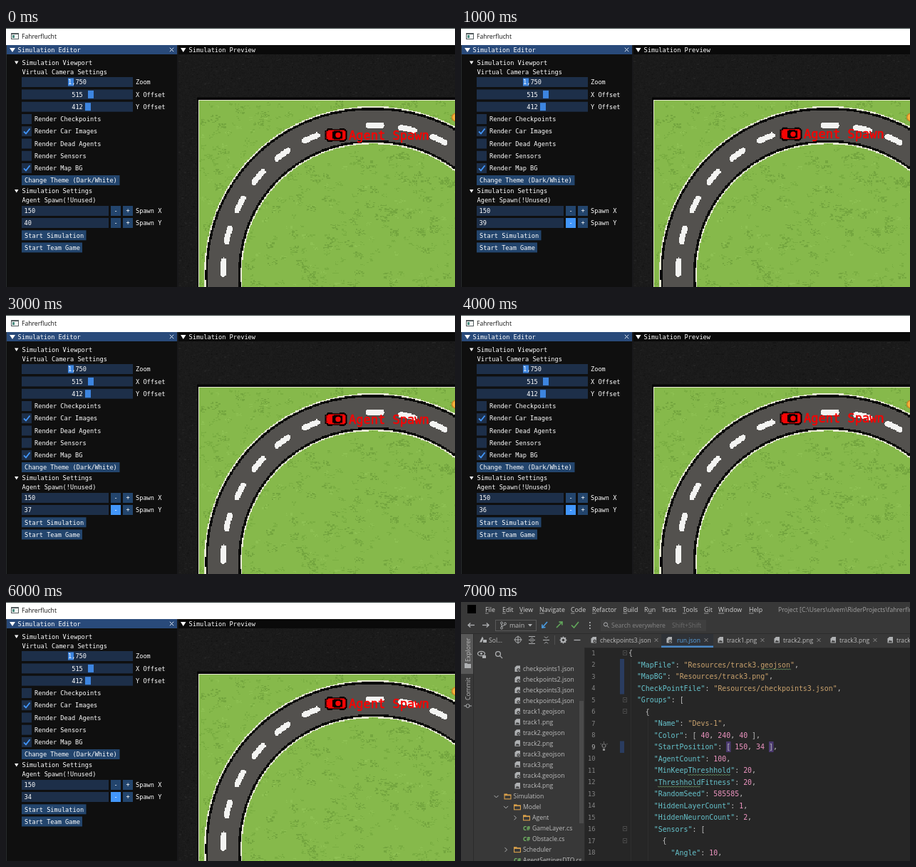
These frames come from a looping animation (630 by 364 pixels, 8 s). An HTML page with a canvas:

```html
<!DOCTYPE html>
<html lang="en">
<head>
<meta charset="utf-8">
<title>Simulation editor</title>
<style>
html, body { margin: 0; width: 100%; height: 100%; overflow: hidden; background: #0f0f0f; }
canvas { display: block; width: 630px; height: 364px; }
</style>
</head>
<body>
<canvas id="stage" width="630" height="364"></canvas>
<script>
const W = 630, H = 364, LOOP = 8000;
const MONO = '"DejaVu Sans Mono", monospace';
const UI = '"Open Sans", "Noto Sans", sans-serif';
const ctx = document.getElementById('stage').getContext('2d');
let g;

function layer(w, h, paint) {
  const c = document.createElement('canvas');
  c.width = w;
  c.height = h;
  g = c.getContext('2d');
  paint();
  return c;
}

function seeded(seed) {
  return () => (seed = (seed * 16807) % 2147483647) / 2147483647;
}

function box(x, y, w, h, color) {
  g.fillStyle = color;
  g.fillRect(x, y, w, h);
}

function text(s, x, y, font, color, align = 'left') {
  g.font = font;
  g.fillStyle = color;
  g.textAlign = align;
  g.fillText(s, x, y);
}

function poly(points, color, fill) {
  g.beginPath();
  for (let i = 0; i < points.length; i += 2) g.lineTo(points[i], points[i + 1]);
  if (fill) {
    g.fillStyle = color;
    g.fill();
  } else {
    g.strokeStyle = color;
    g.stroke();
  }
}

function ring(x, y, r, color, fill) {
  g.beginPath();
  g.arc(x, y, r, 0, 7);
  g[fill ? 'fillStyle' : 'strokeStyle'] = color;
  g[fill ? 'fill' : 'stroke']();
}

function cross(x, y, r, color) {
  poly([x - r, y - r, x + r, y + r], color);
  poly([x + r, y - r, x - r, y + r], color);
}

/* ---- simulation window ---- */

const CELL = 4 / 3;
const FRAME = '#1d2f49', BUTTON = '#23456d', BLUE = '#4296fa', GRAB = '#3d85e0';

const gravel = layer(292, 246, () => {
  const rnd = seeded(77);
  for (let y = 0; y < 246; y++)
    for (let x = 0; x < 292; x++) {
      const v = 24 + Math.floor(rnd() * 6);
      box(x, y, 1, 1, `rgb(${v},${v},${v})`);
    }
  for (let i = 0; i < 900; i++)
    box(Math.floor(rnd() * 292), Math.floor(rnd() * 246), 2, 1, rnd() < .5 ? '#151515' : '#232323');
});

// The bend is very slightly squarer than a circle.
function roadColor(x, y) {
  const dx = 515 - x, dy = 347 - y, p = 2.04;
  const r = (Math.abs(dx) ** p + Math.abs(dy) ** p) ** (1 / p);
  const across = Math.abs(r - 210.5);
  const edge = 26.4 - across;
  if (edge < 0) return null;
  if (edge < 1.8) return '#e6e8d2';
  if (edge < 5) return '#080808';
  const a = Math.atan2(dy, dx) * 180 / Math.PI - 2.9;
  const k = Math.round(a / 12.55);
  const along = Math.abs(a - k * 12.55) * Math.PI / 180 * r;
  const dash = k !== 6 && Math.hypot(across, Math.max(0, along - 9.5)) < 3.9;
  return dash ? '#f4f4f2' : '#53514e';
}

const field = layer(270, 198, () => {
  const rnd = seeded(4242);
  const cell = (x, y, color) => box(Math.floor(x), Math.floor(y), 1 + Math.floor(rnd() * 2), 1, color);
  box(0, 0, 270, 198, '#86b94b');
  for (let i = 0; i < 420; i++) {
    const x = rnd() * 270, y = rnd() * 198, dark = rnd() < .8;
    for (let j = 0; j < 6; j++) cell(x + rnd() * 5, y + rnd() * 4, dark ? '#7aae42' : '#8ec153');
  }
  for (let i = 0; i < 110; i++) {
    const x = rnd() * 270, y = rnd() * 198;
    for (let j = 0; j < 18; j++) cell(x + rnd() * 9, y + rnd() * 7, '#74a63f');
  }
  box(0, 0, 270, 1, '#e6e8d2');
  box(0, 0, 1, 198, '#e6e8d2');
  for (let y = 0; y < 198; y++)
    for (let x = 0; x < 270; x++) {
      const color = roadColor(270 + (x + .5) * CELL, 101 + (y + .5) * CELL);
      if (color) box(x, y, 1, 1, color);
    }
});

function label(s, x, mid, align) {
  text(s, x, mid + 3.2, '8.65px ' + MONO, '#fff', align);
}

function arrowDown(x, y, w, h) {
  poly([x, y, x + w, y, x + w / 2, y + h], '#fff', true);
}

function slider(s, name, mid, grab) {
  box(22, mid - 7, 156, 14, FRAME);
  box(grab, mid - 5.5, 8, 11, GRAB);
  label(s, 100, mid, 'center');
  label(name, 182, mid);
}

function checkbox(name, mid, on) {
  box(22, mid - 7, 14, 14, FRAME);
  if (on) {
    g.lineWidth = 1.8;
    poly([25, mid + .3, 28, mid + 3.3, 33.5, mid - 3.7], BLUE);
    g.lineWidth = 1;
  }
  label(name, 40, mid);
}

function button(s, mid, w) {
  box(22, mid - 7, w, 14, BUTTON);
  label(s, 26, mid);
}

function stepper(s, name, mid) {
  box(22, mid - 7, 122, 14, FRAME);
  box(147, mid - 7, 14, 14, BUTTON);
  box(164, mid - 7, 14, 14, BUTTON);
  if (s) label(s, 25.5, mid);
  label('-', 154, mid, 'center');
  label('+', 171, mid, 'center');
  label(name, 182, mid);
}

const simulation = layer(W, H, () => {
  box(0, 0, W, H, '#0f0f0f');
  box(0, 0, W, 24, '#fff');
  box(0, 0, W, 1, '#3c4746');
  box(7, 7, 11, 9, '#555d60');
  box(8, 9, 9, 6, '#f5f7f7');
  box(9, 10, 3, 4, '#4d8c80');
  text('Fahrerflucht', 22, 15, '8.6px ' + UI, '#111');

  box(0, 24, 1, 340, '#272b2d');
  box(1, 24, 239, 13, '#294a7a');
  arrowDown(5, 28, 8, 6);
  label('Simulation Editor', 16.5, 31);
  cross(232.5, 30.5, 2.7, '#dce5f0');

  arrowDown(12, 46.5, 5.5, 4.5);
  label('Simulation Viewport', 22.5, 48.5);
  label('Virtual Camera Settings', 22.5, 61.5);
  slider('1,750', 'Zoom', 76, 87);
  slider('515', 'X Offset', 93.4, 115);
  slider('412', 'Y Offset', 110.7, 111);
  checkbox('Render Checkpoints', 128, false);
  checkbox('Render Car Images', 145.2, true);
  checkbox('Render Dead Agents', 162.5, false);
  checkbox('Render Sensors', 179.7, false);
  checkbox('Render Map BG', 197, true);
  button('Change Theme (Dark/White)', 214, 137.5);
  arrowDown(12, 227, 5.5, 4.5);
  label('Simulation Settings', 22.5, 229);
  label('Agent Spawn(!Unused)', 22.5, 242);
  stepper('150', 'Spawn X', 257);
  stepper('', 'Spawn Y', 274);
  button('Start Simulation', 291.3, 90.5);
  button('Start Team Game', 308.5, 85);

  g.imageSmoothingEnabled = false;
  g.drawImage(gravel, 242, 37, 389.3, 328);
  box(240, 24, 2, 340, '#18181a');
  box(242, 24, 388, 13, '#0a0a0a');
  arrowDown(245, 28, 7.5, 6);
  label('Simulation Preview', 256.5, 31);
  box(268, 97.5, 362, 267, '#050505');
  g.drawImage(field, 270, 101, 360, 264);
  ring(631, 125.5, 6, '#c98524', true);
  ring(631, 125.5, 4.5, '#f6b13c', true);
});

function drawCar(x, y) {
  const red = '#f50505', black = '#080000';
  const part = (dx, dy, w, h, color) => box(x + dx, y + dy, w, h, color);
  for (const dx of [-12, 5])
    for (const dy of [-9.5, 5.5]) part(dx, dy, 7, 4, black);
  part(-15.5, -6.5, 31, 13, black);
  part(-13, -8.3, 27, 16.6, black);
  part(-13.5, -5.5, 27, 11, red);
  part(-11, -7, 23, 14, red);
  part(-5, -5, 14, 10, black);
  part(-3, -6, 9, 12, black);
  ring(x + 3, y, 3.7, red, true);
  part(-14.5, -4.5, 2, 2.5, '#7a0000');
  part(-14.5, 2, 2, 2.5, '#7a0000');
}

function drawSimulation(second) {
  g = ctx;
  g.drawImage(simulation, 0, 0);
  label(String(40 - second), 25.5, 274);
  if (second > 0) {
    box(147, 267, 14, 14, BLUE);
    label('-', 154, 274, 'center');
  }
  const y = 150.5 - second * CELL;
  drawCar(463, y);
  text('Agent Spawn', 481, y + 6, '17.05px ' + MONO, '#f50505');
  g.strokeStyle = '#f50505';
  g.lineWidth = .6;
  g.strokeText('Agent Spawn', 481, y + 6);
}

/* ---- code editor ---- */

const PANEL = '#383838', EDITOR = '#262626', INK = '#bdbdbd', ICON = '#afb1b3', ORANGE = '#d9a04a';
const ui = (s, x, mid, color = INK, size = 8.6) => text(s, x, mid + 3, size + 'px ' + UI, color);

function fileIcon(x, y, name) {
  poly([x - 1, y - 4.5, x + 4, y - 4.5, x + 4, y + 4, x - 3.5, y + 4, x - 3.5, y - 2], ICON, true);
  if (name.endsWith('.png')) {
    poly([x - 2.5, y + 3, x - .5, y, x + 1, y + 1.5, x + 2, y + .5, x + 3, y + 3], PANEL, true);
  } else {
    ring(x + 1.5, y + 1.5, 2.2, PANEL, true);
    ring(x + 1.5, y + 1.5, 1, ICON, true);
  }
}

function folder(x, y) {
  box(x, y - 4, 4.5, 2, ORANGE);
  box(x, y - 3, 10, 7, ORANGE);
  box(x + 1.1, y - 1.2, 7.8, 4.1, PANEL);
}

function chevron(x, y, open) {
  poly(open ? [x - 3, y - 1.5, x, y + 1.5, x + 3, y - 1.5] : [x - 1.5, y - 3, x + 1.5, y, x - 1.5, y + 3], ICON);
}

function lens(x, y, r) {
  ring(x, y, r, ICON);
  poly([x + r * .7, y + r * .7, x + r * 1.8, y + r * 1.8], ICON);
}

function arrow(x0, y0, x1, y1, color) {
  const a = Math.atan2(y1 - y0, x1 - x0);
  const tip = t => [x1 - 4.5 * Math.cos(a + t), y1 - 4.5 * Math.sin(a + t)];
  poly([x0, y0, x1, y1], color);
  poly([...tip(.75), x1, y1, ...tip(-.75)], color);
}

function sideways(s, x, bottom) {
  g.save();
  g.translate(x, bottom);
  g.rotate(-Math.PI / 2);
  text(s, 0, 3, '8.6px ' + UI, INK);
  g.restore();
}

function menuBar() {
  box(0, 0, W, 24, PANEL);
  box(9, 4, 12, 12, '#000');
  const items = [['File', 34], ['Edit', 58], ['View', 82], ['Navigate', 110], ['Code', 154],
    ['Refactor', 184], ['Build', 227.5], ['Run', 257], ['Tests', 281.5], ['Tools', 311],
    ['Git', 341], ['Window', 361], ['Help', 404]];
  for (const [s, x] of items) {
    ui(s, x, 11, '#d0d0d0', 8.8);
    if (s === 'Tests') continue;
    const skip = s === 'Run' ? g.measureText('R').width : 0;
    box(x + skip, 15.5, g.measureText(s[skip ? 1 : 0]).width, .8, '#b0b0b0');
  }
  ui('Project [C:\\Users\\ulvem\\RiderProjects\\fahrerflucht]', 445, 11, '#a2a2a2', 8.6);
}

function toolBar() {
  box(0, 24, W, 21, PANEL);
  g.lineWidth = 1.3;
  arrow(19, 32.5, 10, 32.5, ICON);
  arrow(30, 32.5, 39, 32.5, ICON);
  g.strokeStyle = '#5a5a5a';
  g.lineWidth = 1;
  g.strokeRect(48.5, 25.5, 57, 15);
  ring(57, 29.5, 1.5, ICON);
  ring(57, 36.5, 1.5, ICON);
  ring(62, 30.5, 1.5, ICON);
  poly([57, 31, 57, 35], ICON);
  poly([62, 32, 57, 34.5], ICON);
  ui('main', 68, 32.5, INK, 9);
  poly([94, 31, 100, 31, 97, 34.5], ICON, true);
  g.lineWidth = 1.6;
  arrow(121, 28, 114, 36, '#4a9be0');
  arrow(134, 36, 142, 28, '#62a85b');
  poly([155, 32.5, 158.5, 36, 165, 28], '#62a85b');
  g.lineWidth = 1;
  for (const dy of [28, 32, 36]) box(180, dy, 1.8, 1.8, ICON);
  box(196, 25, 148, 16, '#3f3f3f');
  lens(203, 31.5, 2.6);
  ui('Search everywhere', 211, 32.5, '#858585', 8.6);
  ui('Shift+Shift', 296, 32.5, '#6c6c6c', 8.6);
  box(0, 44, W, 1, '#2c2c2c');
}

function explorer() {
  box(0, 45, 173, 319, PANEL);
  box(0, 45, 17, 56, '#585858');
  box(17, 45, 1, 319, '#2c2c2c');
  sideways('Explorer', 9.5, 84);
  box(5, 86, 4, 2, ICON);
  box(5, 87, 9, 6, ICON);
  sideways('Commit', 9.5, 138);
  ring(9.5, 146, 2.5, ICON);
  poly([4, 146, 7, 146], ICON);
  poly([12, 146, 15, 146], ICON);

  poly([26, 56.5, 30, 48.5, 31.5, 51.5, 29, 56.5], ICON, true);
  box(31, 53, 5, 4, ICON);
  ui('Sol...', 39, 53.5);
  ring(80, 53, 4.2, ICON);
  poly([74.5, 53, 85.5, 53], ICON);
  poly([80, 47.5, 80, 58.5], ICON);
  for (const y of [48.5, 53.5, 58.5]) poly([95, y, 104, y], ICON);
  poly([97.5, 52, 99.5, 50, 101.5, 52], ICON);
  poly([97.5, 55, 99.5, 57, 101.5, 55], ICON);
  poly([115, 53.5, 124, 53.5], ICON);
  poly([117, 48.5, 119.5, 51, 122, 48.5], ICON);
  poly([117, 58.5, 119.5, 56, 122, 58.5], ICON);
  box(131, 47, 1, 13, '#505050');
  g.lineWidth = 2.2;
  ring(143.5, 53.5, 2.9, ICON);
  g.lineWidth = 1.3;
  for (let i = 0; i < 8; i++) {
    const c = Math.cos(i * Math.PI / 4), s = Math.sin(i * Math.PI / 4);
    poly([143.5 + 3 * c, 53.5 + 3 * s, 143.5 + 5 * c, 53.5 + 5 * s], ICON);
  }
  poly([158.5, 53.5, 167.5, 53.5], ICON);
  lens(52, 73, 3.4);
  g.beginPath();
  g.ellipse(28.5, 72.5, 5, 3.2, 0, 0, 7);
  g.stroke();
  ring(28.5, 72.5, 1.5, ICON, true);
  box(30, 75, 5, 4, ICON);
  g.lineWidth = 1;

  const rowY = i => 94 + i * 14.95;
  const files = [1, 2, 3, 4].map(n => `checkpoints${n}.json`);
  for (const n of [1, 2, 3, 4]) files.push(`track${n}.geojson`, `track${n}.png`);
  files.forEach((name, i) => {
    fileIcon(79, rowY(i), name);
    ui(name, 87, rowY(i));
  });
  const tree = [['Simulation', 73.5, 1], ['Model', 87, 1], ['Agent', 100, 0], ['GameLayer.cs', 100],
    ['Obstacle.cs', 100], ['Scheduler', 87, 0], ['AgentSettingsDTO.cs', 87]];
  tree.forEach(([name, x, open], i) => {
    const y = rowY(12 + i);
    if (open === undefined) {
      text('C#', x - 13, y + 3, 'bold 8px ' + UI, '#73b865');
    } else {
      chevron(x - 24, y, open);
      folder(x - 13, y);
    }
    ui(name, x, y);
  });
  box(166, 139, 6, 172, 'rgba(150,150,150,.2)');
}

function tabs() {
  box(173, 45, 457, 19, PANEL);
  box(281, 45, 73, 19, '#2f3237');
  box(281, 61.5, 73, 2.5, '#4a88c7');
  const list = [['checkpoints3.json', 195, 274], ['run.json', 303, 344], ['track1.png', 373, 423],
    ['track2.png', 452, 502], ['track3.png', 531, 581], ['track4.png', 611, 660]];
  for (const [name, x, close] of list) {
    const active = name === 'run.json';
    fileIcon(x - (active ? 11 : 9), 53.5, name);
    ui(name, x, 53.5, active ? '#5aa2e0' : INK);
    cross(close, 53.5, 2.4, '#8e8e8e');
  }
  box(173, 64, 457, 1, '#2c2c2c');
}

function wave(x, y, w) {
  const points = [];
  for (let i = 0; i <= w; i += 2) points.push(x + i, y + (i % 4 ? 1 : 0));
  g.lineWidth = .8;
  poly(points, '#6b9a65');
  g.lineWidth = 1;
}

function tokenColor(token) {
  if (/^"/.test(token)) return token.endsWith(':') ? '#66c3cc' : '#c9a26d';
  return /^\d/.test(token) ? '#ed94c0' : '#bdbdbd';
}

function codeLine(s, x, y) {
  for (const token of s.match(/"[^"]*":?|\d+|[^"\d]+/g)) {
    const color = tokenColor(token);
    const word = token.endsWith('":') ? token.slice(0, -1) : token;
    text(word, x, y, '9.93px ' + MONO, color);
    x += g.measureText(word).width;
    if (word !== token) {
      text(':', x, y, g.font, '#bdbdbd');
      x += g.measureText(':').width;
    }
  }
}

function codeView() {
  box(173, 65, 457, 299, EDITOR);
  box(173, 65, 1, 299, '#2c2c2c');
  const midY = n => 71.5 + (n - 1) * 16.5;
  const lines = [
    [0, '{'],
    [1, '"MapFile": "Resources/track3.geojson",'],
    [1, '"MapBG": "Resources/track3.png",'],
    [1, '"CheckPointFile": "Resources/checkpoints3.json",'],
    [1, '"Groups": ['],
    [2, '{'],
    [3, '"Name": "Devs-1",'],
    [3, '"Color": [ 40, 240, 40 ],'],
    [3, '"StartPosition": [ 150, 34 ],'],
    [3, '"AgentCount": 100,'],
    [3, '"MinKeepThreshhold": 20,'],
    [3, '"ThreshholdFitness": 20,'],
    [3, '"RandomSeed": 585585,'],
    [3, '"HiddenLayerCount": 1,'],
    [3, '"HiddenNeuronCount": 2,'],
    [3, '"Sensors": ['],
    [4, '{'],
    [5, '"Angle": 10,']
  ];
  box(223, midY(2) - 8, 6, 49.5, '#2a3c60');
  box(223, midY(9) - 8, 6, 16.5, '#2a3c60');
  for (const x of [372, 432]) box(x, midY(9) - 7.5, 6.5, 15, '#4b3a70');
  for (let i = 0; i < 2; i++) box(238 + i * 24, midY(i ? 7 : 2) - 8, .7, 300, '#333');

  lines.forEach(([indent, s], i) => {
    const y = midY(i + 1);
    codeLine(s, 235 + indent * 11.9, y + 3.5);
    text(String(i + 1), 188.5, y + 3.3, '8.7px ' + MONO, i === 8 ? '#b5b5b5' : '#858585', 'right');
    if (/[{[]$/.test(s)) {
      g.strokeStyle = '#484848';
      g.strokeRect(227.5, Math.round(y) - 3.5, 5, 6);
      box(229, Math.round(y) - 1, 2, 1, '#606060');
    }
  });
  wave(421, midY(2) + 6, 42);
  wave(318, midY(11) + 6, 60);
  wave(276, midY(12) + 6, 60);

  const bulb = '#8c8c8c';
  ring(200.5, 202, 2.6, bulb);
  box(199, 206, 3, 3, bulb);
  for (const a of [-2.6, -1.57, -.5])
    poly([200.5 + 4.2 * Math.cos(a), 202 + 4.2 * Math.sin(a), 200.5 + 5.6 * Math.cos(a), 202 + 5.6 * Math.sin(a)], bulb);
}

const editor = layer(W, H, () => {
  menuBar();
  toolBar();
  explorer();
  tabs();
  codeView();
});

/* ---- playback ---- */

function draw(now) {
  const second = Math.floor((now % LOOP) / 1000);
  if (second < 7) drawSimulation(second);
  else ctx.drawImage(editor, 0, 0);
  requestAnimationFrame(draw);
}
draw(0);
</script>
</body>
</html>
```
